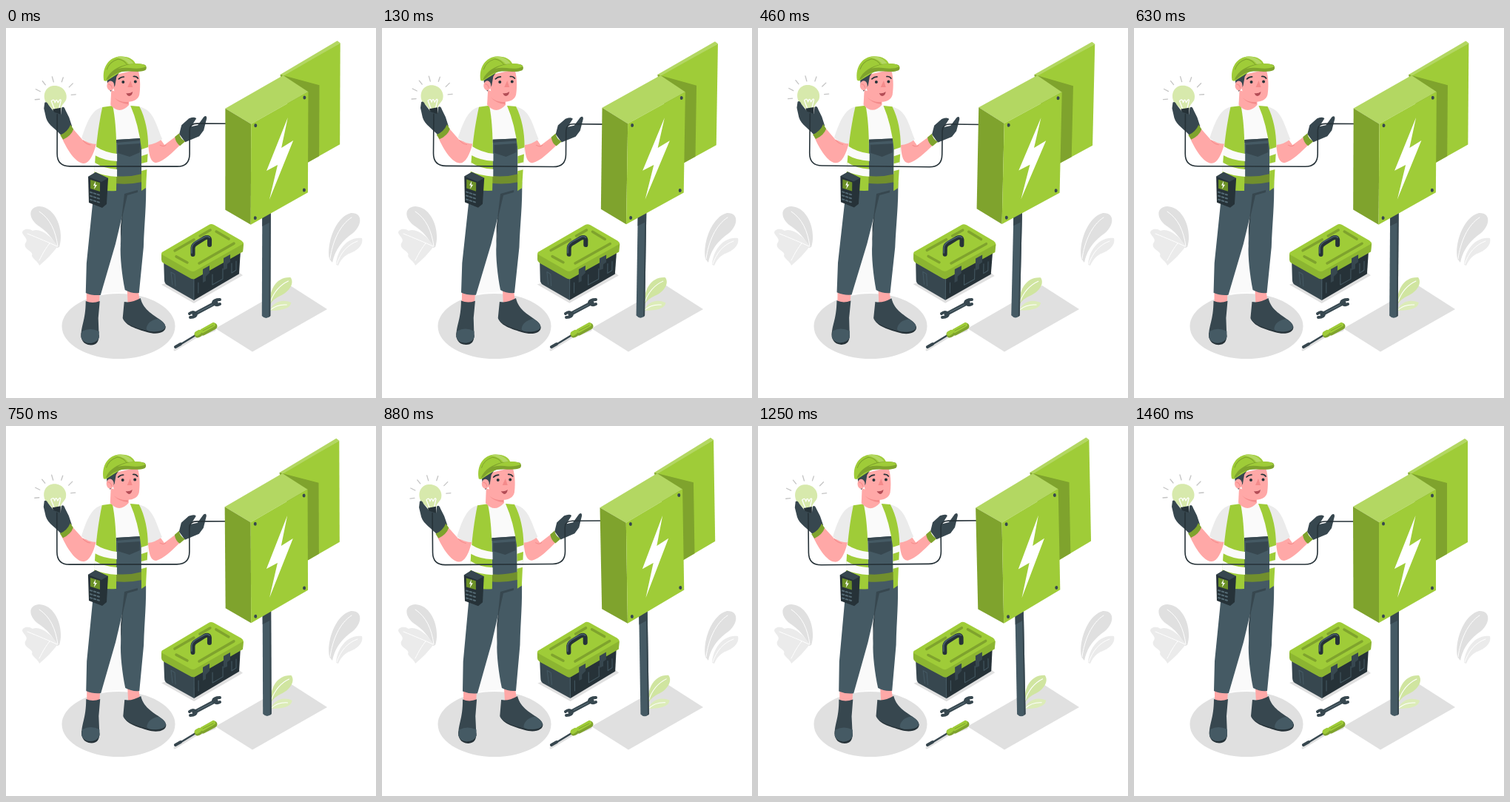
An HTML page for the animation above (1500 ms loop, 500 by 500 pixels).

```html
<!DOCTYPE html>
<html lang="en">
<head>
<meta charset="utf-8">
<title>Electrician</title>
<style>
html, body { margin: 0; width: 100%; height: 100%; overflow: hidden; background: #fff; }
svg { display: block; width: 100vw; height: 100vh; }
.green { fill: #9fcc38; }
.shade { fill: #7fa32d; }
.light { fill: #b3d762; }
.dark { fill: #37474f; }
.ink { fill: #263238; }
.slate { fill: #455a64; }
.skin { fill: #ffa8a7; }
.cloth { fill: #ebebeb; }
.white { fill: #fafafa; }
.grey { fill: #e0e0e0; }
.line { fill: none; stroke-linecap: round; stroke-linejoin: round; }
</style>
</head>
<body>
<svg viewBox="0 0 500 500">
  <!-- ground and plants -->
  <ellipse class="grey" cx="152" cy="403" rx="76.5" ry="44"/>
  <path class="grey" d="M283 406L384 348L434 380L333 437.500Z"/>
  <path class="grey" d="M72 296C79 275 68 242 45 241C30 242 30 256 42 266C56 275 64 285 69 297Z"/>
  <path class="cloth" d="M70 295C60 280 46 270 36 274C30 270 22 272 22 277C24 282 31 285 26 291C23 300 38 301 35 308C37 313 43 315 45 321C55 313 63 304 70 295Z"/>
  <path class="line" stroke="#fff" d="M45 248C60 258 67 274 70 295M29 278C44 284 58 290 69 295M45 314C50 304 54 297 59 291"/>
  <path class="grey" d="M437 312C433 293 444 256 466 250C482 249 482 266 469 277C455 287 445 298 441 317Z"/>
  <path class="cloth" d="M446 320C447 299 463 281 481 284C483 291 478 299 466 304C457 307 452 314 449 321Z"/>
  <path class="line" stroke="#fff" d="M467 256C451 266 441 289 438 312M475 288C461 293 452 304 447 319"/>

  <!-- loose tools -->
  <g class="line" stroke="#37474f">
    <path stroke-width="5" d="M254 387L284 371"/>
    <path stroke-width="4" d="M248 386Q253 382 257 386Q257 391 249 391M289 373Q284 376 280 371Q281 367 289 367"/>
    <path stroke="#617680" d="M259 384L279 374"/>
  </g>
  <g class="line">
    <path stroke="#e0e0e0" stroke-width="3" d="M228 435L256 418L282 408"/>
    <path stroke="#37474f" stroke-width="2.500" d="M235 428L258 414"/>
    <path stroke="#37474f" stroke-width="4" d="M229 431L236 427"/>
    <path stroke="#7fa32d" stroke-width="9" d="M259 414L261 413M266 411L281 403"/>
    <path stroke="#9fcc38" stroke-width="6" d="M258 413L261 411M266 409L280 401"/>
    <path stroke="#7fa32d" d="M266 409L280 402"/>
  </g>

  <g data-sway="1.4 265 317">
    <path class="grey" d="M210 347L254 372L320 334L300 318Z"/>
    <path class="dark" d="M213 312L254 336V368L217 347Q214 345 214 340Z"/>
    <path class="ink" d="M254 336L317 300L315 332L254 368Z"/>
    <path class="line" stroke="#455a64" d="M223 330L225 347M228 333L229 349M223 330L228 333M260 344V358M279 333V347L293 339V325M305 318V331L311 327V315M254 339V367"/>
    <path class="green" d="M210 305Q210 303 213 302L274 266Q277 264 281 266L318 287Q321 289 321 292L320 302L255 339Q252 340 249 338L213 318Q210 316 210 313Z"/>
    <path class="shade" d="M210 306L249 328Q253 330 256 328L321 291L320 302L255 339Q252 340 249 338L213 318Q210 316 210 313Z" opacity=".55"/>
    <path class="line" stroke="#7fa32d" stroke-width="3.500" d="M228 301L254 286M262 281L276 273M230 309L245 317M261 318L308 291M284 275L301 285"/>
    <path class="line" stroke="#263238" stroke-width="6" stroke-linecap="butt" d="M252.500 306V297Q253 293 257 291L268 284Q274 281 275 286V293"/>
    <path class="line" stroke="#455a64" stroke-width="2" d="M251 304V296Q252 292 256 289L267 283Q272 280 275 283"/>
    <path class="dark" d="M266 326L275 321V331L270 336V342L266 344ZM294 311L303 306V316L299 319V325L294 327Z"/>
  </g>

  <g data-sway="1 167 233">
    <!-- legs and boots -->
    <path class="white" d="M157 235L128 359L161 356Z"/>
    <path class="skin" d="M109 358H127L126 374H109ZM164 354H179L181 370L165 374Z"/>
    <path class="slate" d="M119 210L189 208C190 240 187 262 186 296L180 358Q170 359 161 354C157 335 154 308 155 293L157 254L148 292L128 361Q117 362 108 358L109 318L117 238Z"/>
    <path class="dark" d="M160 224L178 219L178 222L164 226L158 252L155 294V268Z"/>
    <path class="ink" d="M102 412C101 420 104 428 115 428.500C123 428 126 424 126 415Z"/>
    <path class="dark" d="M108 369Q117 373 127 369L125 392L126 418C123 428 105 429 102 418C101 403 108 396 108 369Z"/>
    <path class="slate" d="M103 410Q114 404 126 410L126 418C123 428 105 429 102 418Z"/>
    <path class="ink" d="M159 389C157 402 179 407 191 411C204 415 217 412 216 403Z"/>
    <path class="dark" d="M160 370Q170 372 182 365C186 382 201 388 211 396C222 405 212 412 196 410C180 407 160 400 158 392Z"/>
    <path class="slate" d="M190 406C191 399 197 394 206 393C221 402 218 411 196 410Q190 409 190 406Z"/>

    <!-- arms -->
    <path class="skin" d="M89 135L104 152L122 156C118 172 112 184 104 183C94 182 83 166 75 148Z"/>
    <path class="skin" d="M192 157L209 151L214 158L230 146L237 156C225 168 213 180 203 182C195 182 193 171 192 157Z"/>
    <path class="line" stroke="#f48b8b" d="M104 152Q108 157 114 158M208 158Q213 161 216 158"/>

    <!-- torso -->
    <path class="white" d="M135 107L173 105L187 150L186 160L146 160Z"/>
    <path class="cloth" d="M131 107C115 109 108 131 102 149Q111 157 123 157ZM178 106C199 109 202 129 211 150Q202 157 192 158Z"/>
    <path class="slate" d="M149 151L183 149V216L149 220Z"/>
    <path class="dark" d="M149 151L183 149V152L149 155ZM151 158L181 156V168L167 174L151 169Z"/>
    <path fill="#718f2d" d="M148 200Q166 202 184 197V208Q166 212 148 210Z"/>
    <path class="green" d="M130 107L144 105C149 130 150 160 149 220Q131 221 119 217C119 190 121 149 130 107Z"/>
    <path class="green" d="M168 105L180 106C188 121 192 141 192 160L189 216L183 220V164Q179 130 168 105Z"/>
    <path class="white" d="M121 160Q133 168 150 170V180Q132 179 120 172ZM120 182Q132 190 150 191V201Q132 200 119 194ZM183 164L192 161V170L183 173ZM183 183L191 181V191L183 193Z"/>

    <!-- head -->
    <path class="skin" d="M142 84L166 92V104Q153 118 141 104Z"/>
    <path fill="#f48b8b" d="M146 94Q154 101 165 100V103Q153 102 146 94Z"/>
    <path class="skin" d="M144 64L178 56C182 69 181 83 180 90C178 99 166 102 156 98C148 94 143 84 144 64Z"/>
    <path class="dark" d="M136 69L154 58L149 66L147 78L141 86L137 77Z"/>
    <ellipse class="skin" cx="141" cy="78" rx="5" ry="6.500"/>
    <path class="line" stroke="#f48b8b" d="M138 76Q142 76 143 81"/>
    <path fill="#f48b8b" d="M168 71L171 80L164 80Z"/>
    <circle class="ink" cx="158" cy="73" r="2"/>
    <circle class="ink" cx="174.500" cy="72.500" r="2"/>
    <path class="line" stroke="#263238" stroke-width="1.700" d="M152 69Q155 66 159 66M172 65.500Q176 65 178 68"/>
    <path fill="#b34d56" d="M162 88Q167 89 171 86Q170 92 166 92Q163 91 162 88Z"/>
    <path class="green" d="M132 71C129 53 139 39 154 38.500C166 38 173 43 175 49L157 58L138 70Q135 73 132 71Z"/>
    <path class="light" d="M148 39.500Q156 37 162 40Q170 43 173 50L167 51Q162 42 148 39.500Z"/>
    <path class="line" stroke="#7fa32d" d="M136 56Q139 46 151 42Q160 43 164 51"/>
    <path class="shade" d="M135 70C140 58 151 52 164 49Q181 47 188 50Q191 54 188 57C178 61 169 57 157 59Q146 61 138 69Z"/>
    <path class="green" d="M151 55Q161 49 176 48Q186 48 189 52Q181 56 167 54Q159 53 151 55Z"/>

    <!-- meter -->
    <path class="ink" d="M111 201L121 195L138 203L136 238L130 243L112 236Z"/>
    <path class="dark" d="M111 201L121 195L138 203L129 208Z"/>
    <path d="M114 205L127 209V221L114 217Z" fill="#6c9127"/>
    <path fill="#fff" d="M121 207L118 213L120 213L119 218L123 212L120.500 212Z"/>
    <path class="line" stroke="#546a74" stroke-width="2" stroke-dasharray="2.500 2.500" stroke-linecap="butt" d="M114 222L127 226M114 227L127 231M114 232L127 236"/>

    <!-- bulb -->
    <g class="line" stroke="#c4c4c4" stroke-width="1.300">
      <path d="M39 97L45 96.500M40 83L46 86M49 72L53 77M62 66L64 73M77 67L75 73M90 75L85 80M94 90L88 90.500"/>
    </g>
    <path fill="#d7e9ac" d="M59 106C49 101 48 82 62 78.500C75 76 84 87 81 97C79 102 74 104 74 111L64 113Q63 109 59 106Z"/>
    <path class="line" stroke="#fff" stroke-width="1.300" d="M66 112L61 99Q65 95 66 101Q68 94 70 101Q73 95 74 98L71 111"/>
    <path class="ink" d="M63 110L74 108L74 119L66 121Z"/>

    <!-- gloves -->
    <path class="dark" d="M52 101Q55 99 57 104L65 114L74 117L75 108Q78 105 80 111L85 121L89 133L76 147C68 137 57 132 54 122L51 109Z"/>
    <path class="shade" d="M73 145Q83 141 87 131L91 137Q88 146 77 151Z"/>
    <path class="dark" d="M234 143L237 131L247 122Q255 119 257 122L250 133L259 131L267 120Q271 117 271 122L267 138L261 146L242 154Z"/>
    <path class="shade" d="M228 147L234 142Q235 149 242 153L235 159Q229 155 228 147Z"/>
    <path class="line" stroke="#263238" stroke-width="1.600" d="M69 117V170Q69 187 86 187H231Q248 187 248 170V138Q248 129 258 129H302"/>
  </g>

  <g data-sway="2 373 205">
    <path fill="#d0e5a0" d="M357 374C356 355 365 336 385 337C391 345 383 357 371 362Q362 366 357 374Z"/>
    <path fill="#dcecb8" d="M357 382C361 371 373 365 386 371C385 380 371 382 357 382Z"/>
    <path class="line" stroke="#fff" d="M382 342Q365 350 358 370M380 374Q367 373 358 381"/>
    <path class="slate" d="M346.500 248H358V389Q352 395 346.500 389Z"/>
    <path class="dark" d="M346.500 248H358V262L346.500 268ZM356 262H358V389L356 391Z"/>
    <path class="light" d="M370 63L447 17L451 20L375 66Z"/>
    <path class="green" d="M374 65L451 20V157L400 186Z"/>
    <path class="shade" d="M370 63L423 77V173L400 186Z"/>
    <path class="light" d="M296 109L374 64L408 86L331 130Z"/>
    <path class="shade" d="M296 109L331 130V266L296.500 246Z"/>
    <path class="green" d="M331 130L408 86V222L331 266Z"/>
    <path fill="#fff" d="M380.500 121L352 193L367 185L356 232L388 152L372 162Z"/>
    <g class="dark">
      <ellipse cx="337" cy="132" rx="2" ry="2.500"/>
      <ellipse cx="403" cy="94" rx="2" ry="2.500"/>
      <ellipse cx="337" cy="257" rx="2" ry="2.500"/>
      <ellipse cx="403" cy="219" rx="2" ry="2.500"/>
    </g>
  </g>
</svg>
<script>
const LOOP = 1500, LEAD = 40;
const parts = [...document.querySelectorAll('[data-sway]')].map(node => {
  const [degrees, x, y] = node.dataset.sway.split(' ').map(Number);
  return { node, degrees, x, y };
});

// Linear swing: 0, 1 at a quarter, -1 at three quarters, back to 0
function swing(ms) {
  const phase = ((ms + LEAD) / LOOP + 0.25) % 1;
  return 1 - Math.abs(phase - 0.5) * 4;
}

function draw() {
  const s = swing(performance.now());
  for (const { node, degrees, x, y } of parts)
    node.setAttribute('transform', `rotate(${degrees * s} ${x} ${y})`);
  requestAnimationFrame(draw);
}
draw();
</script>
</body>
</html>
```
